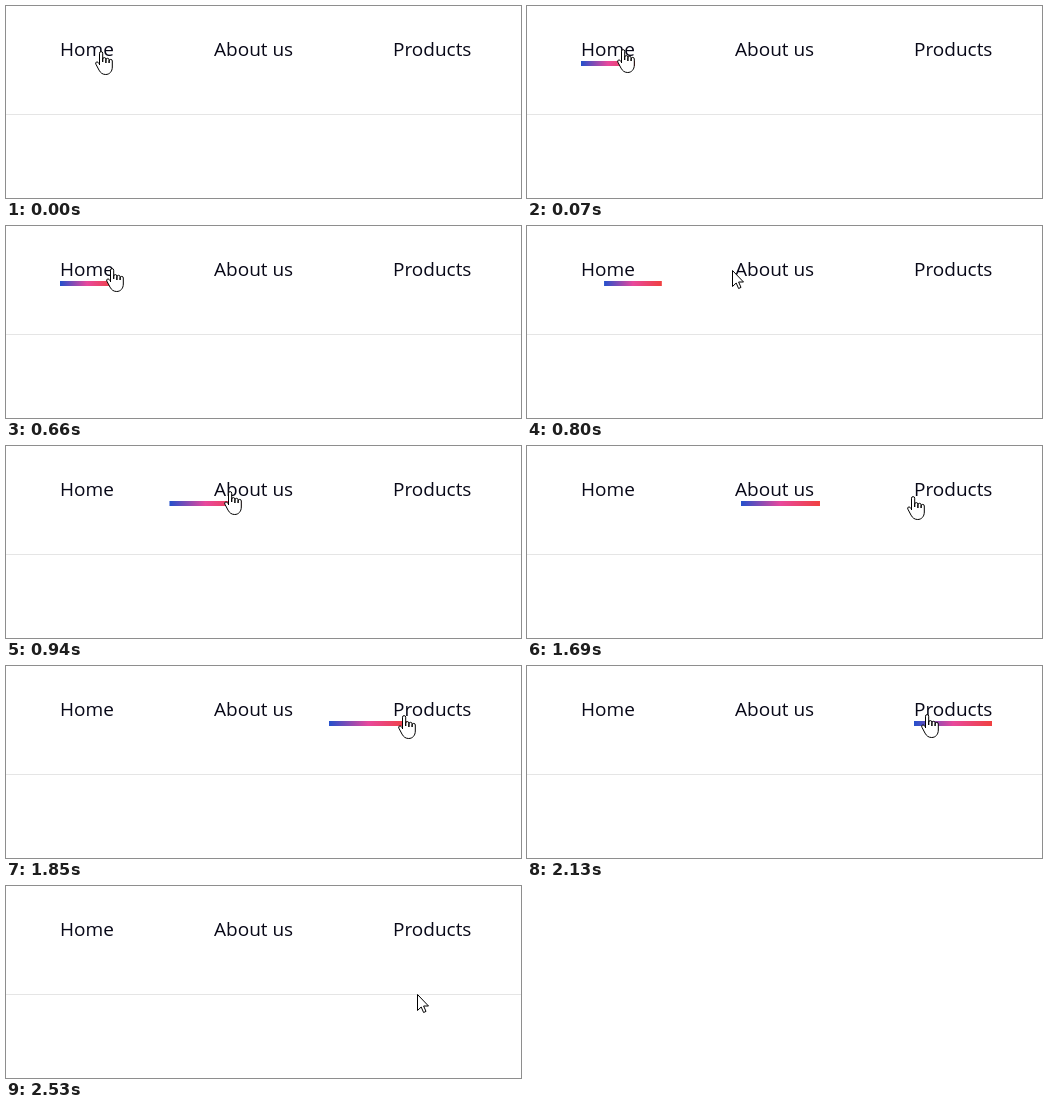
Animation, 515 px wide and 192 px high, one loop 2.6 s. Source, as an HTML page:

```html
<!DOCTYPE html>
<html lang="en">
<head>
<meta charset="utf-8">
<title>Sliding menu underline</title>
<style>
  html, body { margin: 0; width: 100%; height: 100%; overflow: hidden; background: #fff; }
  svg { display: block; }
  text { font: 19px "Open Sans", "Noto Sans", sans-serif; fill: #080818; }
  #hand, #arrow { fill: #fff; stroke: #000; stroke-linejoin: round; }
</style>
</head>
<body>
<svg width="515" height="192" viewBox="0 0 515 192">
  <defs>
    <linearGradient id="tint">
      <stop offset="0" stop-color="#2350cc"/>
      <stop offset=".5" stop-color="#e8489c"/>
      <stop offset="1" stop-color="#f04040"/>
    </linearGradient>
  </defs>
  <rect y="108" width="515" height="1" fill="#e5e5e5"/>
  <text x="54" y="50">Home</text>
  <text x="208" y="50">About us</text>
  <text x="387" y="50">Products</text>
  <rect id="bar" y="55" height="5" fill="url(#tint)"/>
  <path id="hand" d="M4.5 14V2.2a1.6 1.6 0 0 1 3.2 0V11V8.2a1.6 1.6 0 0 1 3.2 0V12V8.9a1.6 1.6 0 0 1 3.2 0V12V10a1.6 1.6 0 0 1 3.2 0V16c0 4.5-2.8 7.5-6.6 7.5c-3.2 0-5.2-1.7-6.7-4.4L.9 13.2c-1-1.8 1-3 2.2-1.8L4.5 13"/>
  <path id="arrow" d="M.5.5V16.5L4.2 13 6.6 18.5 9 17.4 6.6 12H11.5Z"/>
</svg>
<script>
const LOOP = 2600, STEP = 70, SHOW = 70, HIDE = 2460;
const [bar, hand, arrow] = ['bar', 'hand', 'arrow'].map(id => document.getElementById(id));

// Menu items: left edge, width
const items = [[54, 54], [208, 79], [387, 78]];

// Slides of the bar to the next item: start, duration
const slides = [[736, 485], [1668, 434]];

// The picture only changes within these spans, one step at a time
const bursts = [[0, 70], [660, 1220], [1550, 2110], [2460, 2530]];

// Pointer moves: start, x and y to settle at
const moves = [[0, 97, 42], [654, 228, 45], [1480, 400, 50], [1800, 400, 48], [2390, 414, 122]];
const REST = [95, 45], SETTLE = 84;

const clamp = v => Math.min(1, Math.max(0, v));

// CSS "ease", solved by bisection: cubic-bezier(.25, .1, .25, 1)
function ease(x) {
  let lo = 0, hi = 1, u;
  for (let i = 0; i < 24; i++) {
    u = (lo + hi) / 2;
    if (.75 * u * (1 - u) + u ** 3 < x) lo = u; else hi = u;
  }
  return .3 * u * (1 - u) ** 2 + 3 * u * u * (1 - u) + u ** 3;
}

function snap(time) {
  const [from, to] = bursts.findLast(b => b[0] <= time);
  return Math.min(to, from + Math.floor((time - from) / STEP) * STEP);
}

function pointerAt(t) {
  return moves.reduce((pos, [start, ...goal]) => {
    const p = 1 - Math.exp(-Math.max(0, t - start) / SETTLE);
    return pos.map((v, k) => v + (goal[k] - v) * p);
  }, REST).map(Math.round);
}

function barAt(t) {
  return slides.reduce((box, [start, length], i) => {
    const p = ease(clamp((t - start) / length));
    return box.map((v, k) => v + (items[i + 1][k] - v) * p);
  }, items[0]);
}

function show(el, visible) {
  el.style.display = visible ? '' : 'none';
}

function draw(now) {
  const t = snap(now % LOOP);

  const [left, width] = barAt(t);
  bar.setAttribute('x', left);
  bar.setAttribute('width', width);
  show(bar, t >= SHOW && t < HIDE);

  const [x, y] = pointerAt(t);
  const over = y < 70 && items.some(([l, w]) => x >= l - 2 && x <= l + w);
  hand.setAttribute('transform', `translate(${x - 6} ${y})`);
  arrow.setAttribute('transform', `translate(${x} ${y})`);
  show(hand, over);
  show(arrow, !over);
}

const begin = performance.now();
function tick() {
  draw(performance.now() - begin);
  requestAnimationFrame(tick);
}
tick();
</script>
</body>
</html>
```
